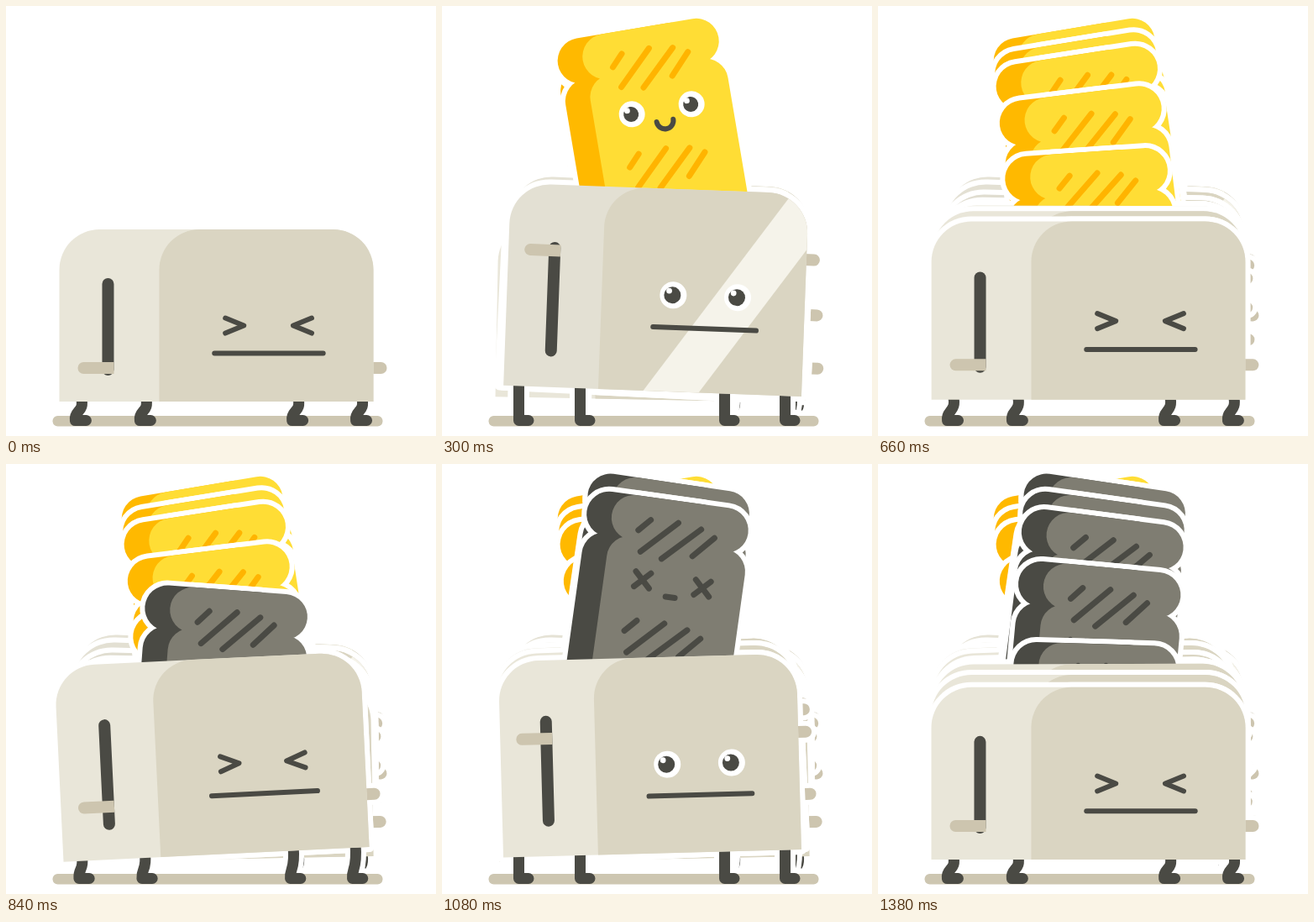
These frames come from a looping animation (512x512 px, 1440 ms). An HTML page with a canvas:

```html
<!DOCTYPE html>
<html lang="en">
<head>
<meta charset="utf-8">
<title>Toaster</title>
<style>
  html, body { margin: 0; width: 100%; height: 100%; overflow: hidden; background: #fff; }
  canvas { display: block; }
</style>
</head>
<body>
<canvas id="stage" width="512" height="512"></canvas>
<script>
const ctx = document.getElementById('stage').getContext('2d');
const STEP = 60, STEPS = 24, HOP = 12, HALO = 6;
const CENTER = 250.5, PIVOT = 46, GROUND = 471, PEAK_Y = 51;
const DARK = '#4a4a44', KNOB = '#cdc5af', FRONT = '#dad5c2';

// One slice per hop; times are in steps from the start of the hop.
const SLICES = [
  { front: '#ffdd35', side: '#ffb900', bar: '#ffb400', peakX: 248.5, tilt: -9.6,
    fallSpeed: 1, sway: 1, leverStart: 1, land: 12.3 },
  { front: '#7f7d72', side: DARK, bar: DARK, peakX: 284.5, tilt: 8.4,
    fallSpeed: 1.28, sway: -1, leverStart: 1.5, land: 11.1, burnt: true }
];

const radians = degrees => degrees * Math.PI / 180;

// Smooth 0 to 1 between two times.
function ramp(from, to, t) {
  const k = Math.min(1, Math.max(0, (t - from) / (to - from)));
  return k * k * (3 - 2 * k);
}

function poseAt(step) {
  const slice = SLICES[Math.floor(step / HOP)], { land, leverStart } = slice;
  const beat = step % HOP;

  // The slice shoots up, floats for a moment, then drops.
  const air = beat - 5;
  const drop = air < 0 ? 4.7 * (-air) ** 3
    : slice.fallSpeed * (16 * air + 30 * Math.max(0, air - 2) ** 1.5);
  const sunk = Math.min(1, drop / 230);

  const stretch = ramp(.5, 3, beat) * (1 - .5 * ramp(3.5, 7.5, beat)) * (1 - ramp(9, land, beat));
  const slim = ramp(1, 3, beat) * (1 - ramp(7, land - 1, beat));
  return {
    step, beat, slice, sunk,
    toastX: slice.peakX + (271 - slice.peakX) * sunk,
    toastY: PEAK_Y + drop,
    toastTilt: slice.tilt * (1 - sunk ** 1.2),
    bottom: GROUND - 13 * stretch,
    height: 205 + 43 * stretch,
    width: 374 - 19 * slim,
    bend: 1 - slim,
    tilt: slice.sway * 3.1 * ramp(0, 2.5, beat) * (1 - ramp(2, 10, beat)),
    lever: .195 + .48 * ramp(leverStart, leverStart + 2, beat) * (1 - ramp(land - 6.1, land - 2.1, beat)),
    faceLift: 17 * ramp(1.5, 3, beat) * (1 - ramp(3, 7, beat)),
    shade: step < 9 ? 10 * ramp(2, 7, step) : 0
  };
}

// In the halo pass every shape is drawn as a white outline.
let halo = false;

function fill(color, build) {
  ctx.beginPath();
  build();
  if (halo) {
    ctx.strokeStyle = '#fff';
    ctx.lineWidth = 2 * HALO;
    ctx.stroke();
  } else {
    ctx.fillStyle = color;
    ctx.fill();
  }
}

function stroke(color, width, build) {
  ctx.beginPath();
  build();
  ctx.strokeStyle = halo ? '#fff' : color;
  ctx.lineWidth = width + (halo ? 2 * HALO : 0);
  ctx.stroke();
}

function line(color, width, ...pts) {
  stroke(color, width, () => {
    for (let i = 0; i < pts.length; i += 2) ctx.lineTo(pts[i], pts[i + 1]);
  });
}

function placed(x, y, degrees, draw) {
  ctx.save();
  ctx.translate(x, y);
  ctx.rotate(radians(degrees));
  draw();
  ctx.restore();
}

const box = (x, y, w, h, r) => ctx.roundRect(x, y, w, h, r);
const panel = (x, w, h) => box(x, -h, w, h, [48, 48, 0, 0]);
const disc = (color, x, y, r) => fill(color, () => ctx.arc(x, y, r, 0, 7));

function eye(x, y, r, pupil) {
  disc('#fff', x, y, r);
  disc(DARK, x - 1, y, pupil);
  disc('#fff', x - 5, y - 5, 3.4);
}

function bread(color, dx) {
  fill(color, () => {
    box(dx - 82, -27, 164, 54, 27);
    box(dx - 81, 22, 166, 173, [27, 27, 0, 0]);
  });
}

function toast({ front, side, bar, burnt }) {
  bread(side, -30);
  bread(front, 0);
  for (const y of [0, 121]) {
    line(bar, 7, -48, y + 14, -35, y);
    line(bar, 7, -42, y + 39, -2, y - 1);
    line(bar, 7, -16, y + 44, 26, y + 3);
    line(bar, 7, 20, y + 36, 43, y + 11);
  }
  for (const x of [-35, 37]) {
    if (burnt) {
      line(DARK, 7, x - 9, 63, x + 9, 81);
      line(DARK, 7, x - 9, 81, x + 9, 63);
    } else {
      eye(x, 73, 15.5, 9);
    }
  }
  if (burnt) line(DARK, 7, -5, 88, 6, 88);
  else stroke(DARK, 6, () => ctx.arc(2.5, 87, 10, 0, Math.PI));
}

function legs({ bottom, tilt, bend }) {
  for (const x of [-159, -86, 86, 158]) {
    const hip = CENTER + x + bend * (6.5 + .054 * x), foot = hip - 7 * bend;
    stroke(DARK, 13, () => {
      ctx.moveTo(hip, bottom + (x - PIVOT) * Math.sin(radians(tilt)) - 5);
      ctx.bezierCurveTo(hip + 5 * bend, 484, foot - 2 * bend, 481, foot, 493.5);
      ctx.lineTo(foot + 11.5 + 1.5 * bend, 493.5);
    });
  }
}

function shine(step, x, w, h) {
  const left = -158 + 73.5 * (step - 3), lean = .7 * h;
  ctx.save();
  ctx.beginPath();
  panel(x, w, h);
  ctx.clip();
  fill('#f5f3ea', () => {
    ctx.moveTo(left, 0);
    ctx.lineTo(left + lean, -h);
    ctx.lineTo(left + lean + 66, -h);
    ctx.lineTo(left + 66, 0);
  });
  ctx.restore();
}

function face({ beat, width: w, height: h, faceLift }) {
  const mouthY = -.281 * h - faceLift, eyeY = -.441 * h - faceLift;
  const squint = beat < 3 || beat >= 10;
  line(DARK, 6, -.006 * w, mouthY, .34 * w, mouthY);
  for (const [x, dir] of [[.058 * w, 1], [.274 * w, -1]]) {
    const outer = x - 11 * dir;
    if (squint) line(DARK, 6, outer, eyeY - 9, x + 11 * dir, eyeY, outer, eyeY + 9);
    else eye(x, eyeY, 16, 10);
  }
}

function toaster(pose) {
  const { step, width: w, height: h, lever, shade } = pose;
  const left = -w / 2, frontX = left + .318 * w, frontW = .682 * w;
  const slotX = left + .155 * w, leverY = -lever * h;
  line(KNOB, 14, w / 2 - 10, leverY, w / 2 + 9, leverY);
  fill(`rgb(${233 - shade},${230 - shade},${217 - shade})`, () => panel(left, w, h));
  fill(FRONT, () => panel(frontX, frontW, h));
  if (step > 0 && step < 9) shine(step, frontX, frontW, h);
  line(DARK, 14, slotX, -.717 * h + 7, slotX, -.151 * h - 7);
  fill(KNOB, () => box(slotX - 36, leverY - 7, 43, 14, [7, 0, 0, 7]));
  face(pose);
}

function drawPose(pose) {
  fill('#cdc6b1', () => box(55.5, 488, 393, 12.5, 6));
  legs(pose);
  if (pose.sunk < 1) placed(pose.toastX, pose.toastY, pose.toastTilt, () => toast(pose.slice));
  placed(CENTER + PIVOT, pose.bottom, pose.tilt, () => {
    ctx.translate(-PIVOT, 0);
    toaster(pose);
  });
}

// Each step is laid over the earlier ones, which leaves a trail until the loop restarts.
function render(last) {
  ctx.fillStyle = '#fff';
  ctx.fillRect(0, 0, 512, 512);
  ctx.lineCap = ctx.lineJoin = 'round';
  for (let step = 0; step <= last; step++) {
    const pose = poseAt(step);
    for (halo of [true, false]) drawPose(pose);
  }
}

let shown = -1;
function tick() {
  const step = Math.floor(performance.now() / STEP) % STEPS;
  if (step !== shown) render(shown = step);
  requestAnimationFrame(tick);
}
tick();
</script>
</body>
</html>
```
